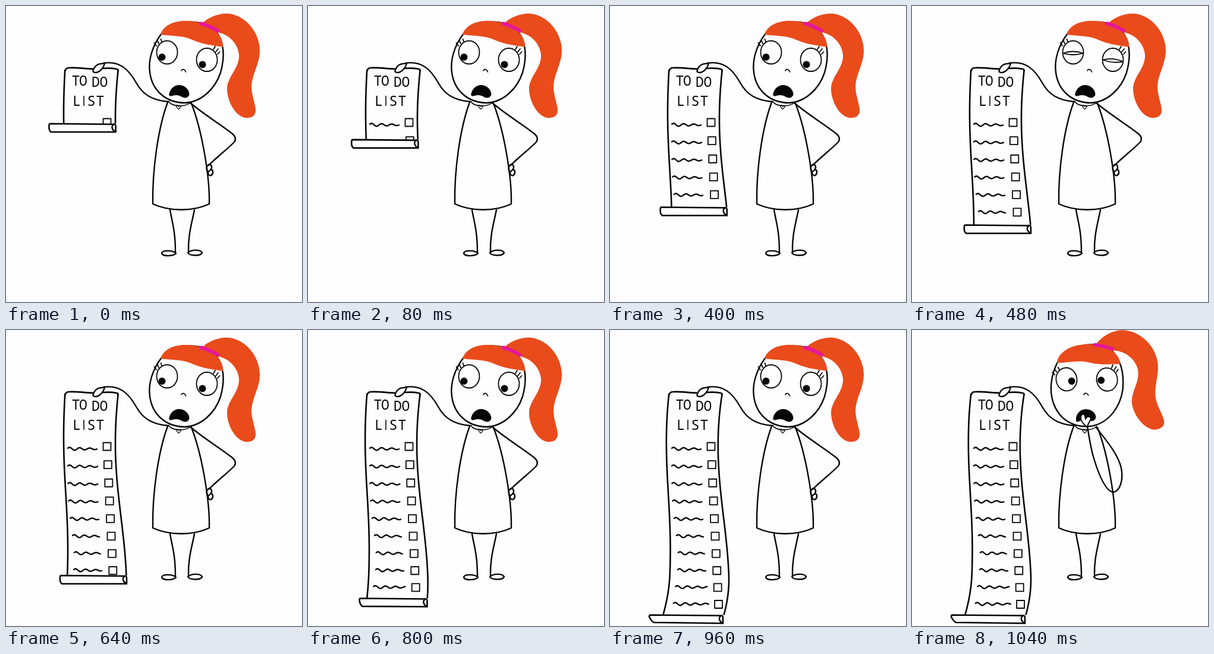
An HTML page with a canvas that plays this animation: 498 px wide and 498 px high, repeating every 2000 ms.

```html
<!DOCTYPE html>
<html lang="en">
<head>
<meta charset="utf-8">
<title>To do list</title>
<style>
  html, body { margin: 0; width: 100%; height: 100%; overflow: hidden; background: #fefdff; }
  canvas { display: block; width: 100vw; height: 100vh; }
</style>
</head>
<body>
<canvas id="stage" width="498" height="498"></canvas>
<script>
const ctx = document.getElementById('stage').getContext('2d');
const PAPER = '#fefdff', INK = '#050505', HAIR = '#e94b1b', BAND = '#e5179b';
const LOOP = 2000, STEP = 80, LAST = 13;
const TOP = 108, ROWS = 10;

// step and height of the roll, straight in between
const DROP = [[0, 198], [3, 278.5], [6, 368.5], [8, 413], [10, 451.5], [12, 479.5]];

const P = d => new Path2D(d);

const body = {
  legs: P('M276 343C279 362 285 377 285 414M317 343C313 364 306 385 307 414'),
  feet: P('M286 416C282 421 264 422 262 416C263 410 281 411 286 416ZM306 415C309 421 328 421 330 415C327 409 311 410 306 415Z'),
  dress: P('M272 162C256 205 246 275 247 333C275 346 315 346 342 333C343 288 330 210 312 164'),
  collar: P('M274 161C280 170 303 170 311 162'),
  heart: P('M290.5 173.5C286 170 286 167 288 167C290 167 290.5 169 290.5 169C291 167 294 167 294 169C294 171 292 172 290.5 173.5Z'),
  arm: P('M164 96C191 92 206 106 219 129C230 149 246 159 274 161'),
  hand: P('M146.5 109C149 100 156 96 166 97C164 104 158 111 152 112C148 112 146 111 146.5 109Z')
};

const hip = {
  arm: P('M310 163C335 184 361 199 381 215Q389 222 384 229C371 242 355 254 341 268'),
  hand: P('M341 267C336 270 337 276 340 279C344 277 348 272 345 268Q343 265 341 267M340 279C340 284 342 286 345 285C349 283 349 276 345 275')
};

const worry = {
  arm: P('M310 164C325 184 346 207 352 232C356 252 350 272 338 273C325 270 313 240 305 213C300 195 298 180 295 162'),
  finger: P('M294 163C288 158 283 152 284 146C286 139 291 140 292 150C294 144 300 145 301 149C300 154 295 158 295 164')
};

const head = {
  face: P('M262 46C246 67 239 91 242 112C246 141 267 162 300 163C329 162 352 139 361 112C367 91 369 65 354 43C332 20 282 22 262 46Z'),
  fringe: P('M260 48C264 34 281 25 301 25C324 25 337 31 350 40C360 47 366 59 365 69C348 66 332 65 315 57.5C297 49 279 51 260 48Z'),
  tail: P('M327 32C339 19 359 11 376 13C405 17 428 47 427 77C426 99 414 114 413 135C413 151 420 165 420 176C420 186 411 189 402 188C384 184 371 157 372 137C374 117 393 104 392 82C390 62 374 47 355 44Z'),
  band: P('M328.5 29.5Q341 33 356 41.5'),
  lashes: P('M253 67L249.5 62M257 63L254 57M262 60L260.5 55.5M349 73L352 68M353 77L357 72M356 81L359.5 77'),
  nose: P('M295 109C296 106 300 105 302.5 111'),
  mouth: P('M275 148C276 140 283 133.5 291 133.5C301 133.5 308 141 308 149C306 155 301 155 296 152.5C290 149 286 149 280 150.5C276 152 274 151 275 148Z')
};
const EYES = [[271, 78], [338, 90.5]];
const LOOK = { list: [[262.5, 86], [330.5, 98.5]], ahead: [[279, 82.5], [328, 90]] };

function stroke(path, w = 2.4, color = INK) {
  ctx.lineWidth = w;
  ctx.strokeStyle = color;
  ctx.stroke(path);
}

function fill(path, color = PAPER) {
  ctx.fillStyle = color;
  ctx.fill(path);
}

function shape(path, w) {
  fill(path);
  stroke(path, w);
}

function oval(x, y, rx, ry = rx) {
  const p = new Path2D();
  p.ellipse(x, y, rx, ry, 0, 0, Math.PI * 2);
  return p;
}

function curve(from, to, step, point) {
  const p = new Path2D();
  for (let v = from; v <= to; v += step) p.lineTo(...point(v));
  return p;
}

function rollHeight(k) {
  const n = DROP.findIndex(([step], i) => i && k <= step);
  if (n < 0) return DROP[DROP.length - 1][1];
  const [k0, y0] = DROP[n - 1], [k1, y1] = DROP[n];
  return y0 + (y1 - y0) * (k - k0) / (k1 - k0);
}

// Near the floor the sheet drifts left and its foot curls in.
function drift(y, bend) {
  const foot = Math.max(0, (y - 410) / 70);
  return bend * (2.5 * (1 - Math.exp((TOP - y) / 40)) + 8 * foot * foot);
}
const leftEdge = (y, bend) => 100.5 - 3.5 * Math.cos(Math.PI * (y - 180) / 190) - drift(y, bend);
const rightEdge = (y, bend) => 193.5 - 9.5 * Math.cos(Math.PI * (y - 190) / 250) - drift(y, bend);

function letter(ch, x, y, font = '"Noto Sans Mono", monospace') {
  ctx.font = '300 23px ' + font;
  ctx.fillText(ch, x, y);
}

function title() {
  ctx.fillStyle = INK;
  ctx.textAlign = 'center';
  [...'TO'].forEach((ch, i) => letter(ch, 117.5 + 12.5 * i, 133.5));
  [...'DO'].forEach((ch, i) => letter(ch, 151 + 13.5 * i, 135.5));
  letter('L', 119, 168);
  letter('I', 131, 168, 'Inter, sans-serif');
  letter('S', 143.5, 168);
  letter('T', 158.5, 168);
}

function row(i, rollY) {
  const bulge = Math.sin(Math.PI * i / (ROWS - 1));
  const box = new Path2D();
  box.rect(163.5 + 1.4 * i, 189.5 + 29.5 * i + 3.5 * bulge, 13, 13);
  stroke(box, 1.8);

  const y = 200 + 29 * i + 2 * bulge;
  if (y + 4 > rollY) return;
  const x0 = 104 + 11 * Math.exp(-(((i - 6.3) / 2.3) ** 2));
  const x1 = 154 + 0.15 * i * i;
  stroke(curve(x0, x1, 1, x => {
    const fade = 1 - 0.6 * (x - x0) / (x1 - x0);
    return [x, y + 2.6 * fade * Math.sin((x - x0) / 2.7 + 3.6)];
  }), 2.4);
}

function drawRoll(y, bend) {
  const x1 = rightEdge(y, bend) + 0.5 - 2 * bend;
  const x0 = x1 - 112 - 12 * bend * bend;
  const b = y + 14, lean = 5 * bend, fold = x1 - 5;
  shape(P(`M${x0 + 2} ${y}L${fold} ${y + 1}Q${x1} ${y} ${x1} ${y + 4}L${x1} ${b}L${x0 + 3 + lean} ${b - 1.5 * bend}Q${x0 - 1 + lean} ${b - 3} ${x0} ${y + 3}Q${x0} ${y} ${x0 + 2} ${y}Z`), 2.6);
  stroke(P(`M${fold + 1} ${y + 2}C${fold - 3} ${y + 5} ${fold - 1} ${y + 11} ${x1} ${b}`));
}

function drawList(k) {
  const y = rollHeight(k);
  const bend = Math.max(0, Math.min(1, (k - 8) / 4)) ** 1.3;
  ctx.save();
  ctx.beginPath();
  ctx.rect(0, 0, 498, y);
  ctx.clip();
  stroke(P('M99.5 109Q101 104 106 104C120 103 134 106 148 106M163 105C173 104 181 105 186 106Q188.5 106 188.5 109'), 2.6);
  for (const edge of [leftEdge, rightEdge]) {
    stroke(curve(TOP, 490, 2, v => [edge(v, bend), v]), 2.6);
  }
  title();
  for (let i = 0; i < ROWS; i++) row(i, y);
  ctx.restore();
  drawRoll(y, bend);
}

function drawEyes(look, blink) {
  EYES.forEach(([x, y], i) => {
    shape(oval(x, y, 17.5, 19.5), 1.8);
    if (blink) {
      const tilt = i * 1.5;
      for (const bow of [-6, 5]) {
        stroke(P(`M${x - 17} ${y + 1.5 - tilt}Q${x} ${y + 1.5 + bow} ${x + 17} ${y + 1.5 + tilt}`), 1.8);
      }
    } else {
      fill(oval(...look[i], 6), INK);
    }
  });
}

function drawHead(thinking, blink) {
  ctx.save();
  if (thinking) {
    ctx.translate(294.5, 83);
    ctx.rotate(-0.18);
    ctx.translate(-305, -84.2);
  }
  shape(head.face);
  fill(head.tail, HAIR);
  fill(head.fringe, HAIR);
  stroke(head.band, 6, BAND);
  stroke(head.lashes, 1.8);
  drawEyes(thinking ? LOOK.ahead : LOOK.list, blink);
  stroke(head.nose, 1.6);
  fill(head.mouth, INK);
  stroke(head.mouth, 1);
  ctx.restore();
}

function draw(k) {
  const thinking = k === LAST;
  fill(P('M0 0H498V498H0Z'));
  ctx.lineCap = ctx.lineJoin = 'round';

  drawList(k);
  stroke(body.legs);
  shape(body.feet);
  stroke(body.dress);
  stroke(body.collar, 1.5);
  stroke(body.heart, 1.3);
  stroke(body.arm);
  shape(body.hand);
  if (!thinking) {
    stroke(hip.arm);
    stroke(hip.hand);
  }
  drawHead(thinking, k === 6);
  if (thinking) {
    stroke(worry.arm);
    shape(worry.finger, 2);
  }
}

const start = performance.now();
function tick() {
  const t = (performance.now() - start) % LOOP;
  draw(Math.min(LAST, Math.floor(t / STEP)));
  requestAnimationFrame(tick);
}
tick();
</script>
</body>
</html>
```
